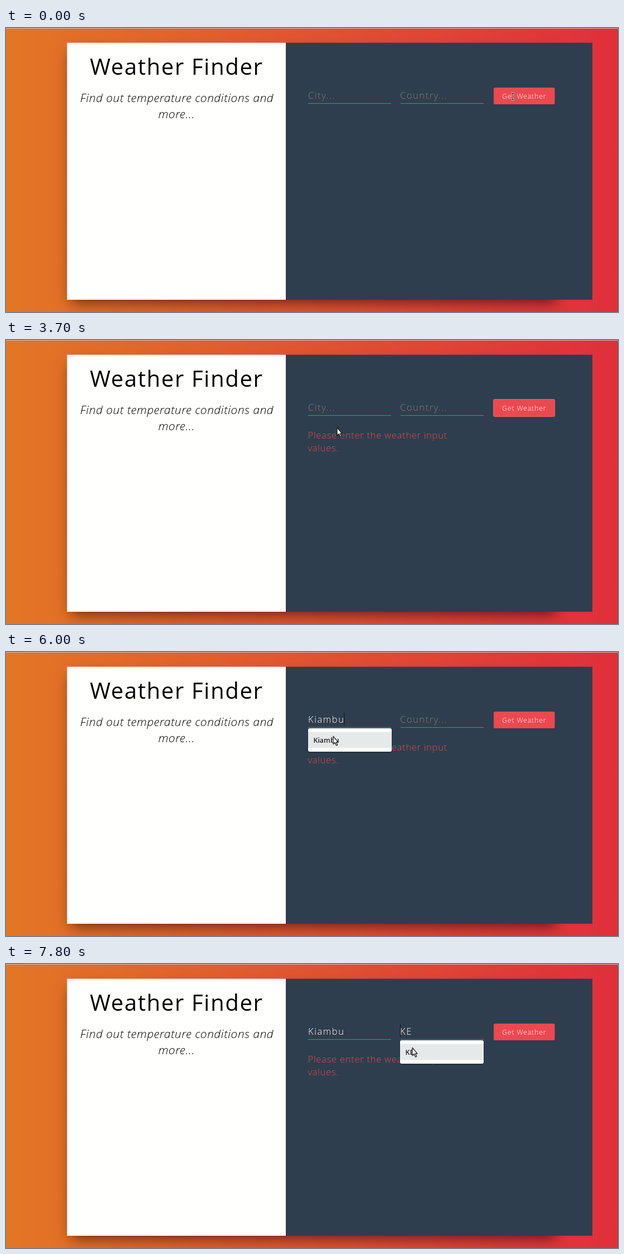
Animation, 1098 px wide and 510 px high, one loop 8000 ms. Source, as an HTML page:

```html
<!DOCTYPE html>
<html lang="en">
<head>
<meta charset="utf-8">
<title>Weather Finder</title>
<style>
html, body { margin: 0; width: 100%; height: 100%; overflow: hidden; }
body { position: relative; background: linear-gradient(to right, #e37625, #e02f3b); }
.shadow {
  position: absolute; left: 110px; top: 27px; width: 884px; height: 461px;
  box-shadow: 0 11px 24px -7px rgba(0, 0, 0, .6);
}
svg { position: absolute; left: 0; top: 0; display: block; }
text { font-family: "Open Sans", "Noto Sans", sans-serif; font-weight: 300; white-space: pre; }
.title { font-size: 40px; font-weight: 400; letter-spacing: 1.7px; text-anchor: middle; }
.sub { font-size: 21px; font-style: italic; letter-spacing: .63px; text-anchor: middle; }
.field { font-size: 16.5px; letter-spacing: 1.55px; fill: #fff; }
.hint { fill: #80817f; }
.message { font-size: 16.5px; letter-spacing: .74px; fill: #e0494f; }
.button { font-size: 12.4px; letter-spacing: .82px; fill: #fff; }
.option { font-size: 12.4px; font-weight: 600; fill: #222; }
.popup { filter: drop-shadow(0 1px 1px rgba(0, 0, 0, .4)); }

/* Every state change is a hard cut on one shared 8 s clock. */
.t { animation: 8s step-end infinite; }
.focus { animation-name: focus; }
.message { animation-name: message; }
.city-hint { animation-name: city-hint; }
.city-text { animation-name: city-text; }
.city-popup { animation-name: city-popup; }
.city-start { animation-name: city-start; }
.city-end { animation-name: city-end; }
.spelling { animation-name: spelling; }
.country-hint { animation-name: country-hint; }
.country-text { animation-name: country-text; }
.country-popup { animation-name: country-popup; }
.country-start { animation-name: country-start; }
.pointer { animation-name: pointer; }
.beam { animation-name: beam; }
.hand { animation-name: hand; }
.arrow { animation-name: arrow; }

@keyframes focus { 0% { opacity: 0 } 13.75% { opacity: 1 } 56.25%, to { opacity: 0 } }
@keyframes message { 0% { opacity: 0 } 18.75%, to { opacity: 1 } }
@keyframes city-hint { 0% { opacity: 1 } 67.5%, to { opacity: 0 } }
@keyframes city-text { 0% { opacity: 0 } 67.5%, to { opacity: 1 } }
@keyframes city-popup { 0% { opacity: 0 } 56.25% { opacity: 1 } 76.25%, to { opacity: 0 } }
@keyframes city-start {
  0% { opacity: 0 } 56.25% { opacity: 1 } 60% { opacity: 0 }
  65% { opacity: 1 } 67.5%, to { opacity: 0 }
}
@keyframes city-end {
  0% { opacity: 0 } 73.75% { opacity: 1 } 80% { opacity: 0 }
  86.25% { opacity: 1 } 93.75%, to { opacity: 0 }
}
@keyframes spelling { 0% { opacity: 0 } 76.25% { opacity: 1 } 93.75%, to { opacity: 0 } }
@keyframes country-hint { 0% { opacity: 1 } 97.5%, to { opacity: 0 } }
@keyframes country-text { 0% { opacity: 0 } 97.5%, to { opacity: 1 } }
@keyframes country-popup { 0% { opacity: 0 } 93.75%, to { opacity: 1 } }
@keyframes country-start { 0% { opacity: 0; fill: #fff } 93.75% { opacity: 1; fill: #fff } 97.5%, to { opacity: 1; fill: #111 } }
@keyframes beam {
  0% { opacity: 1 } 6.25% { opacity: 0 } 50% { opacity: 1 }
  66.25% { opacity: 0 } 82.5% { opacity: 1 } 95%, to { opacity: 0 }
}
@keyframes hand { 0% { opacity: 0 } 6.25% { opacity: 1 } 27.5%, to { opacity: 0 } }
@keyframes arrow {
  0% { opacity: 0 } 27.5% { opacity: 1 } 50% { opacity: 0 }
  66.25% { opacity: 1 } 82.5% { opacity: 0 } 95%, to { opacity: 1 }
}
@keyframes pointer {
  0% { transform: translate(909px, 123px) }
  6.25% { transform: translate(909px, 116px) }
  13.75% { transform: translate(974px, 121px) }
  27.5% { transform: translate(958px, 150px) }
  28.75% { transform: translate(934px, 184px) }
  30% { transform: translate(908px, 213px) }
  31.25% { transform: translate(858px, 240px) }
  32.5% { transform: translate(802px, 254px) }
  33.75% { transform: translate(752px, 248px) }
  35% { transform: translate(732px, 235px) }
  42.5% { transform: translate(710px, 226px) }
  43.75% { transform: translate(686px, 217px) }
  46.25% { transform: translate(594px, 158px) }
  47.5% { transform: translate(592px, 149px) }
  48.75% { transform: translate(591px, 141px) }
  50% { transform: translate(589px, 132px) }
  51.25% { transform: translate(589px, 128px) }
  65% { transform: translate(589px, 131px) }
  66.25% { transform: translate(590px, 139px) }
  67.5% { transform: translate(590px, 146px) }
  68.75% { transform: translate(588px, 150px) }
  70% { transform: translate(587px, 152px) }
  76.25% { transform: translate(593px, 152px) }
  77.5% { transform: translate(610px, 150px) }
  78.75% { transform: translate(634px, 145px) }
  80% { transform: translate(690px, 142px) }
  81.25% { transform: translate(775px, 140px) }
  82.5% { transform: translate(850px, 136px) }
  86.25% { transform: translate(740px, 127px) }
  95% { transform: translate(734px, 142px) }
  97.5%, to { transform: translate(729px, 151px) }
}
@keyframes city-row { 0% { opacity: 0 } 67.5%, to { opacity: 1 } }
@keyframes country-row { 0% { opacity: 0 } 97.5%, to { opacity: 1 } }
.city-row { animation-name: city-row; }
.country-row { animation-name: country-row; }
</style>
</head>
<body>
<div class="shadow"></div>
<svg width="1098" height="510" viewBox="0 0 1098 510">
  <rect width="1098" height="1" fill="#cdbcb4"/>
  <rect x="109.5" y="26.5" width="392.5" height="461.5" fill="#fffffe"/>
  <rect x="502" y="26.5" width="550" height="461.5" fill="#2e3e4e"/>

  <text class="title" x="306" y="84">Weather Finder</text>
  <text class="sub" x="306.5" y="133">Find out temperature conditions and</text>
  <text class="sub" x="306" y="162">more...</text>

  <path d="M542 135.5H691M708 135.5H857" stroke="#e8494f"/>
  <text class="field hint t city-hint" x="542" y="126.5">City...</text>
  <text class="field t city-text" x="542" y="126.5">Kiambu</text>
  <path class="t spelling" d="M543 130.5H607" stroke="#d8343c" stroke-dasharray="2 1"/>
  <text class="field hint t country-hint" x="707" y="126.5">Country...</text>
  <text class="field t country-text" x="707" y="126.5">KE</text>

  <rect x="875" y="107" width="109.5" height="30" rx="2" fill="#ec484f"/>
  <rect class="t focus" x="874.5" y="106.5" width="110" height="31" rx="2" fill="#ec484f" stroke="#e5676c"/>
  <text class="button" x="890" y="126.5">Get Weather</text>

  <g class="t message">
    <text x="541.5" y="177">Please enter the weather input</text>
    <text x="541.5" y="200">values.</text>
  </g>

  <rect class="t city-start" x="542" y="109" width="1" height="22" fill="#fff"/>
  <rect class="t city-end" x="606.5" y="109" width="1" height="22" fill="#111"/>
  <rect class="t country-start" x="707" y="109" width="1" height="22"/>

  <g class="t city-popup">
    <rect class="popup" x="542" y="137" width="150" height="42" rx="3" fill="#fff"/>
    <rect class="t city-row" x="542" y="143.5" width="150" height="29" fill="#e6e9ea"/>
    <text class="option" x="551.5" y="162.5">Kiambu</text>
  </g>
  <g class="t country-popup">
    <rect class="popup" x="707" y="137" width="150" height="42" rx="3" fill="#fff"/>
    <rect class="t country-row" x="707" y="143.5" width="150" height="29" fill="#e6e9ea"/>
    <text class="option" x="716.5" y="162.5">KE</text>
  </g>

  <g class="t pointer" fill="none" stroke-linejoin="round">
    <g class="t beam">
      <path id="bar" d="M-3-6H-1L0-5L1-6H3M0-5V5M-3 6H-1L0 5L1 6H3" stroke="#fff" stroke-width="2.6"/>
      <path d="M-3-6H-1L0-5L1-6H3M0-5V5M-3 6H-1L0 5L1 6H3" stroke="#111" stroke-width="1.2"/>
    </g>
    <path class="t arrow" d="M0 0V14L3.2 11L5.6 16.5L7.8 15.5L5.4 10.3H9Z" transform="translate(0 -.5)" fill="#fff" stroke="#111" stroke-width="1.2"/>
    <path class="t hand" d="M-2 11V2Q-2 .5-.5 .5T1 2V7Q3 5.5 4 7.5Q6 6.5 6.5 8.5Q8.5 8 8.5 10V13Q8.500 16 6.500 18.500H-1Q-3 15.500-5.500 11.500Q-5-.0-5.500 11.500Q-4 9-2 11Z" fill="#fff" stroke="#111"/>
  </g>
</svg>
</body>
</html>
```
